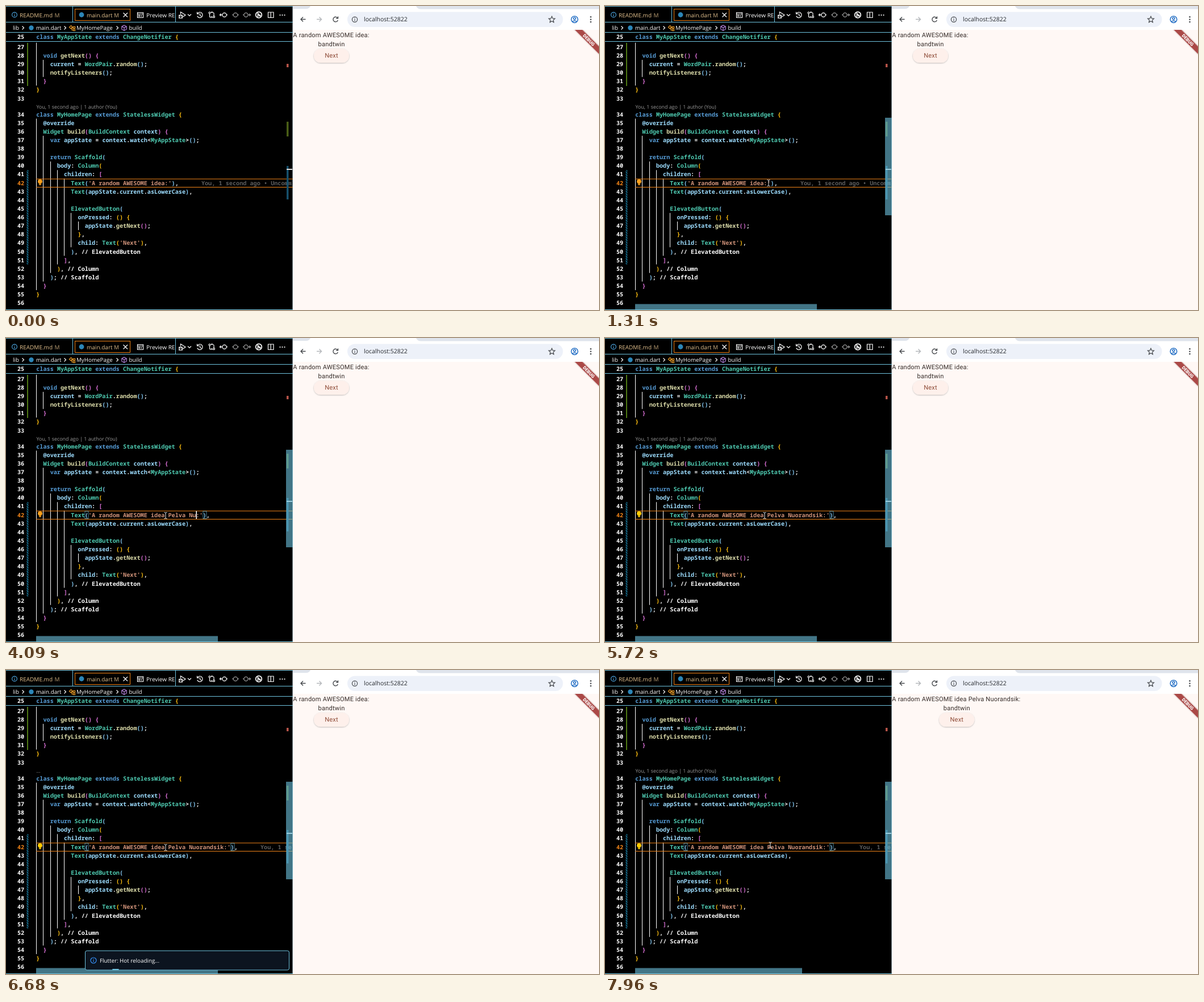
Animation, 1044 px wide and 536 px high, one loop 7990 ms. Source, as an HTML page:

```html
<!DOCTYPE html>
<html lang="en">
<head>
<meta charset="utf-8">
<title>Hot reload</title>
<style>
  html, body { margin: 0; width: 100%; height: 100%; overflow: hidden; background: #000; }
  svg { display: block; width: 1044px; height: 536px; }
  text { white-space: pre; text-rendering: geometricPrecision; font: 500 9.8px "Open Sans", "Noto Sans", sans-serif; fill: #fff; }
  .tabs text { font-size: 10px; }
  .code text { font: 600 10.2px "Noto Sans Mono", "DejaVu Sans Mono", monospace; }
  .app text { font: 11.07px Roboto, sans-serif; letter-spacing: .198px; fill: #352c29; }
  .icon { fill: none; stroke: #fff; stroke-width: 1.2; }
  .chrome .icon { stroke: #46494d; stroke-width: 1.4; }
  .chrome .thin { stroke-width: 1.2; }
  .edge { fill: none; stroke: #6fc3df; }
  .orange { fill: none; stroke: #f38518; }
  .slider { fill: #6fc3df; fill-opacity: .6; }
</style>
</head>
<body>
<svg viewBox="0 0 1044 536">
  <defs>
    <clipPath id="editorClip"><rect width="505" height="536"/></clipPath>
    <clipPath id="toastClip"><rect width="505" height="535"/></clipPath>
    <clipPath id="tabClip"><rect width="297.5" height="30"/></clipPath>
    <clipPath id="pageClip"><rect x="505" y="42" width="539" height="494"/></clipPath>
    <pattern id="hatch" width="3" height="3" patternUnits="userSpaceOnUse" patternTransform="rotate(45)">
      <rect width="3" height="1.7" fill="#1b81a8"/>
    </pattern>
    <filter id="soft" x="-20%" y="-40%" width="140%" height="200%">
      <feDropShadow dx="0" dy=".8" stdDeviation=".8" flood-opacity=".28"/>
    </filter>
    <filter id="glow" x="-20%" y="-60%" width="140%" height="220%">
      <feDropShadow dx="0" dy="0" stdDeviation="1.2" flood-opacity=".35"/>
    </filter>
  </defs>

  <rect width="505" height="536"/>
  <rect x="504" width="1" height="536" fill="#6f7a80"/>

  <g clip-path="url(#editorClip)">
    <g id="code" class="code"></g>
    <g id="guides" stroke="#fff"></g>
    <rect x="37" y="65" width="2" height="76" fill="#4f7a14"/>
    <rect x="36.5" y="289.5" width="3" height="166" fill="url(#hatch)"/>
    <path class="orange" d="M53 305H505M53 319.5H505"/>
    <text id="lens" x="53.5" y="181.3" style="font-size:8.9px;fill:#999"></text>
    <g id="bulb">
      <path d="M60 305.3a4 4 0 0 0-2.2 7.3v1.2h4.4v-1.2a4 4 0 0 0-2.2-7.3z"/>
      <path d="M58.1 314.2h3.8v1.7h-3.8z"/>
    </g>
    <g id="match" class="edge" stroke-opacity=".65">
      <rect x="139" y="305.5" width="6" height="13"/>
      <rect id="matchEnd" y="305.5" width="6" height="13"/>
    </g>
    <rect id="caret" y="305" width="1.6" height="14" fill="#fff"/>

    <rect y="46" width="504" height="16"/>
    <g id="sticky" class="code"></g>

    <rect x="494" y="102" width="3.5" height="6" fill="#b9544a"/>
    <rect x="494" y="204" width="3.5" height="26" fill="#4b5f16"/>
    <rect x="494" y="282" width="3.5" height="59" fill="#16506c"/>
    <rect x="494" y="287" width="10" height="2" fill="#ddd"/>
    <g id="bars" class="slider">
      <rect x="493" y="197" width="12" height="172"/>
      <rect id="hbar" x="53" y="525.5" height="9.5"/>
    </g>
  </g>

  <!-- tabs and breadcrumbs -->
  <path class="edge" d="M0 .5H505M0 28.5H505M0 46.5H505M0 62.5H505M0 535.5H505M117.5 1V28M298.5 1V28"/>
  <rect class="orange" x="121.5" y="5.5" width="97" height="20"/>
  <circle class="icon" cx="15" cy="15.5" r="4.4" style="stroke:#4a9fd8"/>
  <path d="M15 15v3M15 12.7v1.1" stroke="#4a9fd8" stroke-width="1.2"/>
  <g class="tabs" clip-path="url(#tabClip)">
    <g style="--m:#e2c08d">
      <text x="24" y="19.5" style="fill:var(--m)">README.md</text>
      <text x="85.5" y="19.5" style="fill:#b79c72">M</text>
      <text x="142" y="19.5" style="fill:var(--m)">main.dart</text>
      <text x="190" y="19.5" style="fill:#c9ab7e">M</text>
    </g>
    <circle cx="133" cy="15.5" r="4.4" fill="#2c86b8"/>
    <path class="icon" d="M206.5 12l7.5 7.5M214 12l-7.5 7.5"/>
    <path class="icon" d="M231.5 11.5h10v9h-10zM231.5 14h10M233 16.4h3M233 18.4h3M238 16v3"/>
    <text x="247" y="19.5">Preview README.md</text>
  </g>
  <text x="12" y="42">lib</text>
  <text x="53" y="42">main.dart</text>
  <text x="124" y="42">MyHomePage</text>
  <text x="216.5" y="42">build</text>
  <path class="icon" d="M28.5 35.5l3 3-3 3M102.5 35.5l3 3-3 3M194.5 35.5l3 3-3 3"/>
  <circle cx="44.5" cy="38.5" r="4.2" fill="#2c86b8"/>
  <path class="icon" d="M111.5 37.5l3-3 2.5 2.5-3 3zM116 38.5h2.5M116 38.5v4h2.5M118.5 36.5h3v3h-3zM118.5 41h3v2.5h-3z" style="stroke:#ee9d28"/>
  <path class="icon" d="M208 34l4.2 2.2v4.8l-4.2 2.4-4.2-2.4v-4.8zM203.8 36.2l4.2 2.2 4.2-2.2M208 38.4v5" style="stroke:#b180d7"/>

  <g class="icon">
    <path d="M307.5 14.5v-4l8.5 5.5-5 3.2M305 17.5h5M307.5 15.5a2.3 2.5 0 0 1 0 6 2.3 2.5 0 0 1 0-6M304 16l1.5 1M311 16l-1.5 1M304 21.5l1.5-1M311 21.5l-1.5-1"/>
    <path d="M320 14.5l3 3 3-3"/>
    <path d="M337 13.5a4.8 4.8 0 1 1-.3 4M336.5 10.5v3.3h3.3M341.5 13v3.5l2.5 1.5"/>
    <path d="M358.5 13.5v4.5q0 2 2 2h2.5l-1.8-1.8M366 17.5v-4q0-2-2-2h-2.5l1.8-1.8"/>
    <circle cx="358.5" cy="12" r="1.5"/><circle cx="366" cy="19.2" r="1.5"/>
    <circle cx="384.5" cy="15.7" r="3.6"/>
    <path d="M381 15.7h-4.5l2.2-2.2M376.5 15.7l2.2 2.2M388 15.7h2"/>
    <g opacity=".6">
      <circle cx="404" cy="15.7" r="3.6"/><circle cx="422.5" cy="15.7" r="3.6"/>
      <path d="M398 15.7h2.4M407.6 15.7h2.4M417 15.7h2M426 15.7h4.5l-2.2-2.2M430.5 15.7l-2.2 2.2"/>
    </g>
    <g stroke-width="1.7">
      <circle cx="445" cy="15.7" r="5.3"/>
      <path d="M443.5 12v7.5M443.5 14l3.5 3"/><circle cx="447" cy="17" r=".8"/>
    </g>
    <path d="M461.5 11h9.5v9.5h-9.5zM466.2 11v9.5"/>
  </g>
  <g fill="#fff"><circle cx="482.5" cy="16" r="1.1"/><circle cx="486.5" cy="16" r="1.1"/><circle cx="490.5" cy="16" r="1.1"/></g>

  <g clip-path="url(#toastClip)">
    <g id="toast">
      <rect class="edge" x="139.5" y="495" width="359" height="34" rx="3" style="fill:#0c141f"/>
      <circle class="icon" cx="154" cy="512" r="5" style="stroke:#3794ff"/>
      <path d="M154 511.5v3.2M154 509v1.3" stroke="#3794ff" stroke-width="1.2"/>
      <text x="165" y="515.7">Flutter: Hot reloading...</text>
      <rect id="bit" y="527" height="2" fill="#6fc3df"/>
    </g>
  </g>

  <!-- browser -->
  <g class="chrome">
    <rect x="505" width="539" height="42.5" fill="#fff"/>
    <path d="M505 0h31q-2 5-8 5h-23zM722 0h322v5.5H731q-7 0-9-5.5z" fill="#dfe4ec"/>
    <rect x="601" y="10.5" width="379.5" height="26.5" rx="13.2" fill="#edf1f9"/>
    <path class="icon" d="M527.5 23.5h-8.5M523 19.5l-4 4 4 4"/>
    <path class="icon" d="M547 23.5h8.5M551.5 19.5l4 4-4 4" style="stroke:#b4b7bb"/>
    <path class="icon" d="M584 21.5a4.3 4.3 0 1 0 .3 3.5M584.5 18.5v3.3h-3.3"/>
    <circle class="icon thin" cx="614" cy="23.7" r="4.6"/>
    <path class="icon thin" d="M614 23.3v3M614 20.8v1.2"/>
    <text x="630" y="27.3" style="font-size:10.5px;font-weight:400;fill:#25282c">localhost:52822</text>
    <path class="icon thin" d="M961 18.3l1.6 3.6 3.9.4-2.9 2.6.8 3.9-3.4-2-3.4 2 .8-3.9-2.9-2.6 3.9-.4z"/>
    <g fill="none" stroke="#1565c0" stroke-width="1.4"><circle cx="1001" cy="23.7" r="5.8"/><circle cx="1001" cy="21.8" r="1.9"/><path d="M997 27.5q4-3 8 0"/></g>
    <g fill="#46494d"><circle cx="1029.5" cy="19.3" r="1.3"/><circle cx="1029.5" cy="23.7" r="1.3"/><circle cx="1029.5" cy="28.1" r="1.3"/></g>
  </g>
  <g class="app" clip-path="url(#pageClip)">
    <rect x="505" y="42" width="539" height="494" fill="#fff8f5"/>
    <text id="idea" x="505.3" y="55"></text>
    <g id="middle">
      <text y="70.8" text-anchor="middle">bandtwin</text>
      <rect x="-31" y="75.5" width="62" height="24.5" rx="12.25" fill="#fef0eb" filter="url(#soft)"/>
      <text y="91.3" text-anchor="middle" style="fill:#8f4c38">Next</text>
    </g>
    <g transform="translate(1044 42) rotate(45)">
      <rect x="-36" y="20.6" width="72" height="9.5" fill="#ab4a46" filter="url(#glow)"/>
      <text y="28.2" text-anchor="middle" style="font-size:8.07px;font-weight:900;letter-spacing:0;fill:#fff">DEBUG</text>
    </g>
  </g>

  <path id="beam" d="M-2.5-5.5q2.5 0 2.5 1.2 0-1.2 2.5-1.2M0-4.5V4.5M-2.5 5.5q2.5 0 2.5-1.2 0 1.2 2.5 1.2" fill="none" stroke="#eee"/>
  <path id="arrow" d="M0 0v12.5l2.9-2.7 1.9 4.3 2-.9-1.9-4.2h4z" fill="#fff" stroke="#000" stroke-width=".8"/>
</svg>

<script>
const LOOP = 7990;
const NAME = ' Pelva Nuorandsik';
const IDEA = 'A random AWESOME idea';
const TYPED = [2080, 2520, 2900, 3250, 3480, 3610, 3760, 3990, 4090,
               4350, 4410, 4480, 4640, 4790, 5020, 5120, 5220];
// time, x, y
const MOUSE = [[440, 854, 538], [1210, 287, 311], [1310, 288, 312], [1570, 281, 313],
               [7740, 281, 313], [7960, 291, 309]];
const X0 = 53.2, CH = 6.12, LH = 15.12, EDIT = 42;
const $ = id => document.getElementById(id);

const source = `class MyAppState extends ChangeNotifier {
  var current = WordPair.random();

  void getNext() {
    current = WordPair.random();
    notifyListeners();
  }
}

class MyHomePage extends StatelessWidget {
  @override
  Widget build(BuildContext context) {
    var appState = context.watch<MyAppState>();

    return Scaffold(
      body: Column(
        children: [
          Text('A random AWESOME idea:'),
          Text(appState.current.asLowerCase),

          ElevatedButton(
            onPressed: () {
              appState.getNext();
            },
            child: Text('Next'),
          ), // ElevatedButton
        ],
      ), // Column
    ); // Scaffold
  }
}
`.split('\n');

const BRACKETS = ['#ffc010', '#da70d6', '#87cefa'];
const KEYWORDS = /^(class|extends|var|void|return)$/;
const TOKEN = /'[^']*'|\/\/.*|@?\w+|[()[\]{}]|\s+|./g;
let depth = 0;

function colour(token, next) {
  if ('([{'.includes(token)) return BRACKETS[depth++ % 3];
  if (')]}'.includes(token)) return BRACKETS[--depth % 3];
  if (token[0] === "'") return '#ce9178';
  if (KEYWORDS.test(token)) return '#569cd6';
  if (/^[A-Z]/.test(token)) return '#4ec9b0';
  if (/^\w/.test(token)) return next === '(' ? '#dcdcaa' : '#9cdcfe';
  if (token[0] === '@') return '#9cdcfe';
  return '#fff';
}

function paint(line) {
  const tokens = line.match(TOKEN) || [];
  return tokens.map((s, i) =>
    `<tspan fill="${colour(s, tokens[i + 1])}">${s.replace('<', '&lt;')}</tspan>`).join('');
}

const centre = n => n < 34 ? 163 - (33 - n) * LH : 191 + (n - 34) * LH;
const row = (n, y, html) =>
  `<text x="20" y="${y}" style="fill:${n === EDIT ? '#f38518' : '#fff'}">${n}</text>` +
  `<text id="row${n}" x="${X0}" y="${y}">${html}</text>`;

let editDepth, rows = '';
source.forEach((line, i) => {
  const n = i + 25;
  if (n === EDIT) editDepth = depth;
  const html = paint(line);
  if (n === 25) $('sticky').innerHTML = row(n, 58.2, html);
  else rows += row(n, centre(n) + 3.6, html);
});
$('code').innerHTML = rows + `<text id="note" y="${centre(EDIT) + 3.6}" style="fill:#5c5c5c">You, 1 second ago • Uncommitted changes</text>`;

// indent column, first line, last line
$('guides').innerHTML = [[0, 27, 31], [2, 29, 30], [0, 35, 54], [2, 37, 53], [4, 40, 52],
  [6, 41, 51], [8, 42, 50], [10, 46, 49], [12, 47, 47]].map(([col, a, b]) =>
  `<path d="M${Math.round(X0 + col * CH) + .5} ${centre(a) - LH / 2}V${centre(b) + LH / 2}"/>`).join('');

const clamp = v => Math.min(1, Math.max(0, v));
const between = (t, a, b) => t >= a && t < b;
const show = (id, on) => $(id).setAttribute('visibility', on ? 'visible' : 'hidden');
const set = (id, name, value) => $(id).setAttribute(name, value);

function mouseAt(t) {
  let i = 0;
  while (i < MOUSE.length - 2 && t >= MOUSE[i + 1][0]) i++;
  const [a, b] = [MOUSE[i], MOUSE[i + 1]];
  const p = clamp((t - a[0]) / (b[0] - a[0]));
  const e = i ? p : 1 - (1 - p) ** 2;
  return [a[1] + (b[1] - a[1]) * e, a[2] + (b[2] - a[2]) * e];
}

let shown = -1;
function typeLine(count) {
  if (count === shown) return;
  shown = count;
  depth = editDepth;
  $('row' + EDIT).innerHTML = paint(`          Text('${IDEA}${NAME.slice(0, count)}:'),`);
  const at = col => X0 + (col + count) * CH;
  set('caret', 'x', at(37) - .3);
  set('matchEnd', 'x', at(39));
  set('note', 'x', at(47.5));
}

function draw(t) {
  typeLine(TYPED.filter(s => t >= s).length);
  show('note', t < 2220 || t >= 6600);
  show('match', t >= 1840);
  show('caret', between(t, 1840, 5720) || between(t, 6220, 6610) || between(t, 7110, 7620));
  show('bulb', !between(t, 4410, 5470));
  set('bulb', 'fill', t < 5000 ? '#f9a01b' : '#ffcc00');
  $('lens').textContent = between(t, 5970, 6800) ? '…' : 'You, 1 second ago | 1 author (You)';

  // toast slides up, its progress bit widens as it travels
  const up = clamp((t - 6210) / 300);
  const rise = 1 - (1 - up) ** 2;
  show('toast', between(t, 6210, 7050));
  set('toast', 'opacity', rise);
  set('toast', 'transform', `translate(0 ${(1 - rise) * 34})`);
  const p = clamp((t - 6120) / 4000), width = 7.18 * (1 + 4 * p);
  set('bit', 'x', Math.max(139.5, 142.6 + 359 * p - width / 2));
  set('bit', 'width', width);

  const reloaded = t >= 6830;
  set('hbar', 'width', t >= 6740 ? 294 : 320);
  $('idea').textContent = IDEA + (reloaded ? NAME : '') + ':';
  set('middle', 'transform', `translate(${reloaded ? 619.3 : 573} 0)`);

  const [x, y] = mouseAt(t), inside = x < 505;
  show('beam', inside);
  show('arrow', !inside && t >= 440);
  for (const id of ['beam', 'arrow']) set(id, 'transform', `translate(${x} ${y})`);
  const entered = 440 + 770 * (1 - Math.sqrt(1 - 349 / 567));
  set('bars', 'opacity', clamp((t - entered) / 100));
}

function tick() {
  draw(performance.now() % LOOP);
  requestAnimationFrame(tick);
}
tick();
</script>
</body>
</html>
```
